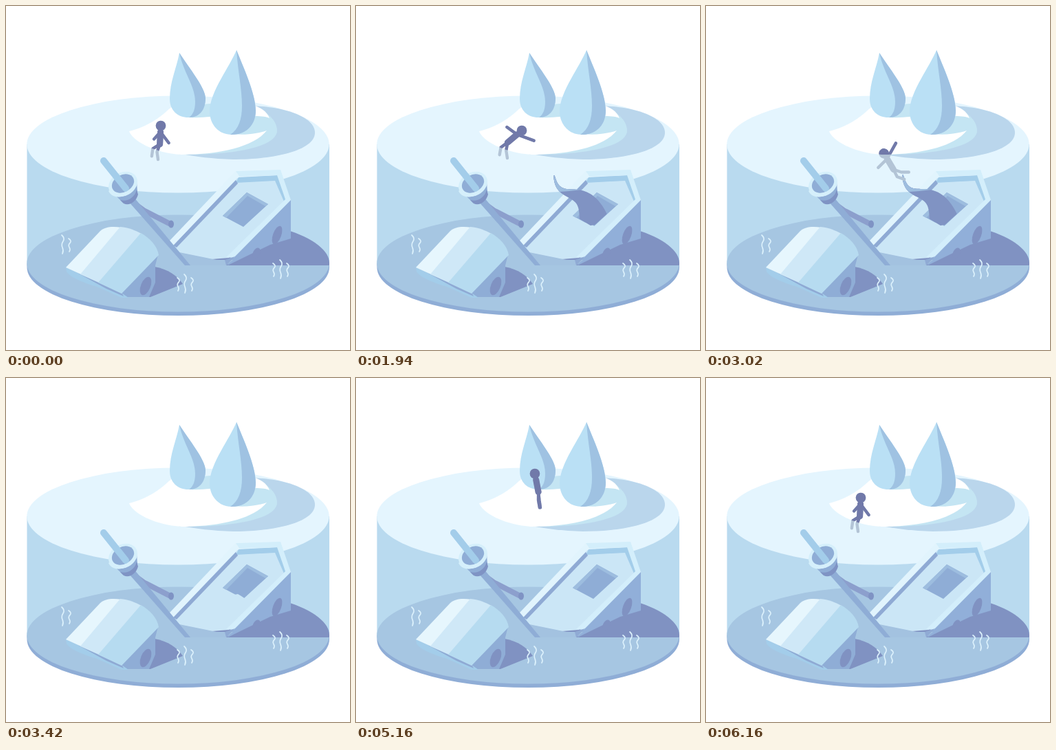
An HTML page for the animation above (6200 ms loop, 500 by 500 pixels).

```html
<!DOCTYPE html>
<html lang="en">
<head>
<meta charset="utf-8">
<title>Shipwreck lake</title>
<style>
html, body { margin: 0; width: 100%; height: 100%; overflow: hidden; background: #fff; }
svg { display: block; width: 100vw; height: 100vh; }
#man { fill: currentColor; stroke: currentColor; stroke-linecap: round; stroke-linejoin: round; }
#man path { fill: none; stroke-width: 4.4; }
#man #torso { stroke-width: 9; }
#man circle { stroke: none; }
.weed { fill: none; stroke: #dcf1fc; stroke-width: 1.7; stroke-linecap: round; }
</style>
</head>
<body>
<svg viewBox="0 0 500 500">
  <defs>
    <clipPath id="floorClip"><ellipse cx="250" cy="374" rx="220" ry="70"/></clipPath>
    <clipPath id="topClip"><ellipse cx="250" cy="201" rx="220" ry="70.5"/></clipPath>
    <clipPath id="holeClip"><path d="M0 0H500V288H380L344 321L316 304H0Z"/></clipPath>
    <clipPath id="landClip"><path d="M0 0H500V181H379C360 205 310 216 255 216C215 214 183 195 179 182H0Z"/></clipPath>
  </defs>

  <!-- water block -->
  <path fill="#8fadd6" d="M30.5 374V380A219.7 70 0 0 0 470 380V374Z"/>
  <path fill="#b9daef" d="M30.5 201V374H470V201Z"/>
  <ellipse cx="250" cy="374" rx="219.7" ry="70.5" fill="#a6c6e2"/>
  <path fill="#8092c2" clip-path="url(#floorClip)" d="M262 377L400 300H480V377Z"/>
  <ellipse cx="250" cy="201" rx="219.7" ry="70.5" fill="#e4f5fe"/>

  <!-- island -->
  <path fill="#bad6ec" d="M345 145C400 144 449 160 449 184C449 210 390 223 330 223C300 222 275 219 256 215Z"/>
  <path fill="#c4e5f3" d="M238 148L296 142L363 147C384 156 394 169 394 181C394 204 335 217 252 216Z"/>
  <path fill="#fff" d="M179 182C206 175 222 164 240 147L262 161C275 164 288 161 297 161L312 183C340 190 364 186 379 181C360 205 310 216 255 216C215 214 183 195 179 182Z"/>
  <path fill="#fff" d="M356 143C370 147 379 153 383 163C376 160 369 160 358 160Z"/>

  <path fill="#bae0f5" d="M252 68C248 90 238 110 238 135C238 152 250 162 265 162C281 162 290 150 290 134C290 119 266 90 252 68Z"/>
  <path fill="#9fc2e2" d="M252 68C258 97 275 116 275 139C275 150 272 158 266 162C282 162 290 150 290 134C290 119 266 90 252 68Z"/>

  <!-- bow -->
  <path fill="#91afd9" d="M414 281V338L384 347L357 360L322 377L328 360Z"/>
  <ellipse cx="394" cy="333" rx="6" ry="14" transform="rotate(20 394 333)" fill="#8092c2"/>
  <ellipse cx="364" cy="359" rx="5" ry="8" transform="rotate(25 364 359)" fill="#8092c2"/>
  <path fill="#cbe6f6" d="M242 346L336 250L400 247L407 283L324 366L262 371Z"/>
  <path fill="#a3cdea" d="M338 249L395 246L409 282L404 284L391 254L334 257Z"/>
  <path fill="#8faad4" d="M243 348L334 253L337 258L248 351Z"/>
  <path fill="#d3eefb" d="M334 240L399 238L414 282L331 366L320 365L406 281L394 246L337 248Z"/>
  <path fill="#e1f4fd" d="M237 342L334 240L339 247L243 348Z"/>
  <path fill="#a3c2e0" d="M237 342L252 358L306 369H330L320 377H262Z"/>
  <path fill="#8faad4" d="M318 369L333 364L320 377Z"/>
  <path fill="#8fadd6" d="M315 305L350 271L381 288L345 321Z"/>
  <path fill="#9dbddf" d="M315 305L350 271L381 288L377 291L351 276L320 308Z"/>
  <path id="chip" fill="#cbe6f6" d="M332 315L337 314L342 317L348 321H338Z"/>

  <!-- mast -->
  <path stroke="#8c9fcd" stroke-width="8" fill="none" d="M185 286L200 297L239 317"/>
  <ellipse cx="240" cy="317" rx="4" ry="5.5" fill="#7f93c4"/>
  <path fill="#8fadd6" d="M178 284L186 278L268 377H260Z"/>
  <path fill="#8fadd6" d="M152 268L190 254L191 272C190 283 177 289 170 286Z"/>
  <path fill="#7f93c4" d="M166 282C176 285 187 279 190 267L192 274C189 285 179 291 171 287Z"/>
  <ellipse cx="170" cy="259" rx="22" ry="17" transform="rotate(-28 170 259)" fill="#d5effb"/>
  <ellipse cx="170" cy="258" rx="17" ry="12.5" transform="rotate(-28 170 258)" fill="#8fadd6"/>
  <path stroke="#a3cdea" stroke-width="10" stroke-linecap="round" fill="none" d="M142 225L174 265"/>
  <path stroke="#d5effb" stroke-width="4.5" fill="none" d="M151 268C156 280 178 277 188 260"/>

  <!-- stern -->
  <path fill="#8092c2" d="M170 423H210L257 404C250 393 235 382 216 379Z"/>
  <path fill="#8fadd6" d="M221 361L217 377V402L208 423H172L166 416Z"/>
  <ellipse cx="203" cy="407" rx="7" ry="14" transform="rotate(22 203 407)" fill="#8092c2"/>
  <path fill="#a3cdea" d="M87 380L168 417L178 424H168L132 408C112 402 92 394 88 386Z"/>
  <path fill="#8faad4" d="M104 388L169 418L171 422L146 411Z"/>
  <path fill="#e6f6fd" d="M87 380L137 327C144 321 154 320 168 322L109 390Z"/>
  <path fill="#cfe8f7" d="M108 390L166 321C178 322 188 326 197 331L135 402Z"/>
  <path fill="#b6dbf0" d="M134 402L196 330C209 337 220 349 222 362L168 418Z"/>

  <g class="weed" id="weeds"></g>

  <!-- tentacle -->
  <g clip-path="url(#holeClip)">
    <path id="arm" fill="#8093c3"/>
    <g clip-path="url(#topClip)"><use href="#arm"/><path id="armTop" fill="#9dbddf"/></g>
  </g>

  <!-- swimmer: pale under water, solid on land -->
  <g id="figure">
    <g clip-path="url(#holeClip)" color="#b3c4d6">
      <g id="man">
        <path id="limbs"/><path id="torso"/><circle id="head" r="7.3"/>
      </g>
    </g>
    <g clip-path="url(#landClip)" color="#7179a9"><use href="#man"/></g>
  </g>

  <path fill="#bae0f5" d="M335 64C326 87 296 125 296 153C296 173 310 187 328 187C350 187 363 172 363 152C363 127 344 87 335 64Z"/>
  <path fill="#9fc2e2" d="M335 64C337 95 343 120 343 145C343 165 338 179 326 187C350 188 363 172 363 152C363 127 344 87 335 64Z"/>
</svg>
<script>
const LOOP = 6200;
const $ = id => document.getElementById(id);
const mix = (a, b, k) => a + (b - a) * k;
const ramp = (t, a, b) => Math.min(1, Math.max(0, (t - a) / (b - a)));
const ease = k => k * k * (3 - 2 * k);
const blend = (a, b, k) => a.map((v, i) => mix(v, b[i], k));

// Each clump has one tall strand
function clump(x, y, count) {
  return Array.from({ length: count }, (_, i) => {
    const tall = i === count - 2, s = (tall ? 27 : 19) / 6;
    return `<path d="M${x + 10 * i} ${tall ? y : y + 5}` +
           `q5 ${s} 2 ${2 * s}t-1 ${2 * s}t0 ${2 * s}"/>`;
  }).join('');
}
$('weeds').innerHTML = clump(81, 333, 2) + clump(249, 390, 3) + clump(388, 369, 3);

// Tentacle: a cubic curve from base to tip
const rise = [347, 318, 335, 250, 294, 292, 288, 246];
const reach = [346, 318, 318, 180, 222, 320, 215, 213];
const sunk = rise.map((v, i) => mix(v, i % 2 ? 345 : 352, .9));
const armKeys = [[1220, sunk], [1940, rise], [2600, reach], [2660, reach], [3060, rise], [3380, sunk]];

function spine(t) {
  const i = armKeys.findIndex(key => key[0] > t);
  if (i < 1) return sunk;
  const [t0, a] = armKeys[i - 1], [t1, b] = armKeys[i];
  return blend(a, b, ease(ramp(t, t0, t1)));
}

function outline([x0, y0, x1, y1, x2, y2, x3, y3]) {
  const at = (a, b, c, d, u) =>
    a * (1 - u) ** 3 + 3 * b * u * (1 - u) ** 2 + 3 * c * u * u * (1 - u) + d * u ** 3;
  const slope = (a, b, c, d, u) =>
    (b - a) * (1 - u) ** 2 + 2 * (c - b) * u * (1 - u) + (d - c) * u * u;
  const left = [], right = [], steps = 40;
  for (let i = 0; i <= steps; i++) {
    const u = i / steps, rest = 1 - u;
    const width = 18 * rest ** 2.2 + 4.5 * Math.sqrt(rest) + .4;
    const x = at(x0, x1, x2, x3, u), y = at(y0, y1, y2, y3, u);
    const dx = slope(x0, x1, x2, x3, u), dy = slope(y0, y1, y2, y3, u);
    const k = width / (Math.hypot(dx, dy) || 1);
    left.push([x - dy * k, y + dx * k]);
    right.unshift([x + dy * k, y - dx * k]);
  }
  return 'M' + left.concat(right).map(p => p.map(v => v.toFixed(2))).join('L') + 'Z';
}

// Pose: head x, y, lean, arms, arm reach, then thigh and shin of each leg.
// Angles in degrees, 0 points down, positive to the right.
const sit = [225, 174, -3, -42, 37, 20, -58, -8, -20, 8];
const lie = [241, 181, -50, -126, 70, 26, -54, -10, -10, 9];

function walk(t) {
  const up = ramp(t, 4600, 5160), down = ramp(t, 5160, 5760);
  const s = 22 * Math.sin((t - 5160) / 240 * Math.PI) * (1 - ramp(t, 5640, 5760));
  return [mix(318, 260, up) - 32 * down, mix(124, 139, up) + 21 * down,
          11, 10 + s, 12 - s, 18, -s, 10 - s / 2, 6 + s, 8 + s / 2];
}

function pose(t) {
  return t < 4600 ? blend(sit, lie, ease(ramp(t, 20, 560)))
                  : blend(walk(t), sit, ease(ramp(t, 5760, 6140)));
}

function drawMan([x, y, lean, armL, armR, span, thighL, shinL, thighR, shinR]) {
  const step = ([px, py], deg, len) => {
    const a = deg * Math.PI / 180;
    return [px + Math.sin(a) * len, py + Math.cos(a) * len];
  };
  const neck = step([x, y], lean, 9), hip = step(neck, lean, 18);
  const arm = (deg, len) => `M${neck}L${step(neck, deg, len)}`;
  const leg = (thigh, shin) => {
    const knee = step(hip, thigh, 12);
    return `M${hip}L${knee}L${step(knee, shin, 11)}`;
  };
  $('limbs').setAttribute('d', arm(armL, span * .7) + arm(armR, span) + leg(thighL, shinL) + leg(thighR, shinR));
  $('torso').setAttribute('d', `M${neck}L${hip}`);
  $('head').setAttribute('cx', x);
  $('head').setAttribute('cy', y);
}

function draw(t) {
  const arm = spine(t), d = outline(arm);
  $('arm').setAttribute('d', d);
  $('armTop').setAttribute('d', d);
  $('chip').style.display = t >= 1250 && t < 4140 ? '' : 'none';

  $('figure').style.display = t > 3380 && t < 4600 ? 'none' : '';
  drawMan(pose(t));
  let move = '';
  if (t > 2660 && t < 3400) {
    const turn = -83 * ease(ramp(t, 2660, 3060));
    const sink = ramp(t, 3120, 3360);
    move = `translate(${arm[6] + 22 * sink} ${arm[7] + 42 * sink}) rotate(${turn}) ` +
           `scale(${1 - .4 * sink}) translate(-215 -213)`;
  }
  $('man').setAttribute('transform', move);
}

function tick() {
  draw(performance.now() % LOOP);
  requestAnimationFrame(tick);
}
tick();
</script>
</body>
</html>
```
